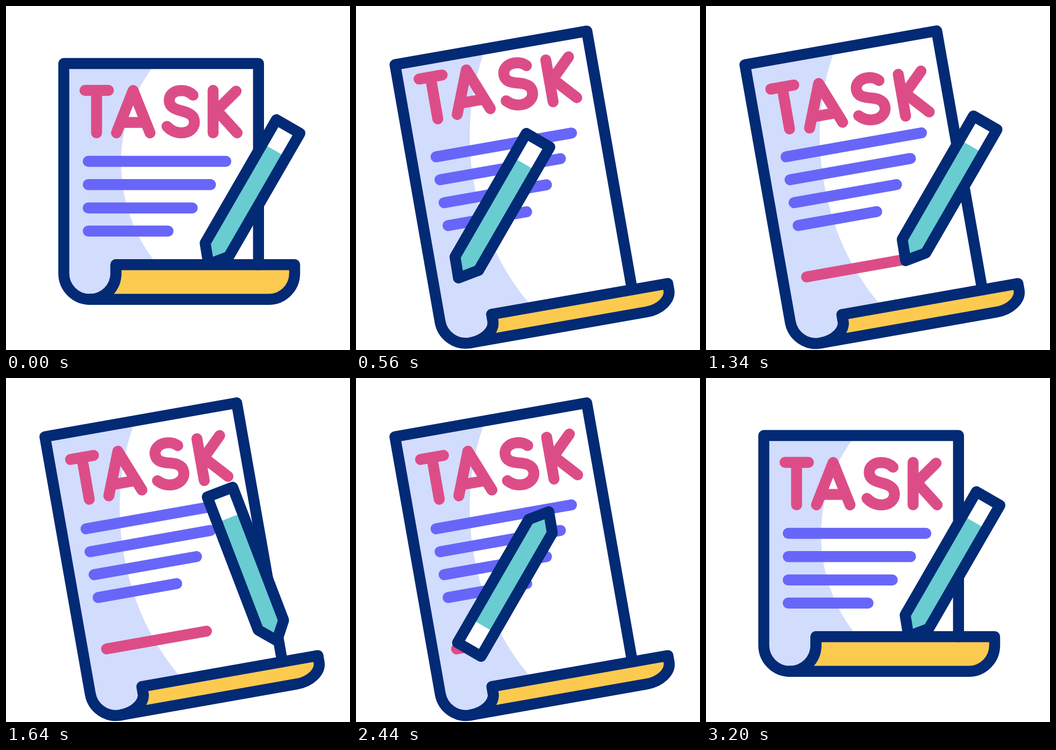
These frames come from a looping animation (640x640 px, 3420 ms). An HTML page with a canvas:

```html
<!DOCTYPE html>
<html lang="en">
<head>
<meta charset="utf-8">
<title>Task</title>
<style>
html, body { margin: 0; width: 100%; height: 100%; overflow: hidden; background: #fff; }
canvas { display: block; width: 640px; height: 640px; }
</style>
</head>
<body>
<canvas id="stage" width="640" height="640" role="img" aria-label="Task"></canvas>
<script>
const ctx = document.getElementById('stage').getContext('2d');
const LOOP = 3420;
const NAVY = '#032a75', LAVENDER = '#d2dcfd', PURPLE = '#6866f9',
      PINK = '#dc4d87', TEAL = '#68ccd1', YELLOW = '#fdca50', WHITE = '#fff';
const STROKE = 20.4;

const PIVOT = [102.5, 308.7];
const HOME = [450.9, 352.3], LINE_START = [263.5, 378], LINE_END = [447, 345.2], LIFTED = [451, 350.5];

const TEXT_LINES = [[289, 409], [332.3, 380.5], [375.7, 346.5], [418.8, 301.5]];
const LETTERS = [
  'M147 157H190.5M168.5 157V236',
  'M205.5 236L236.5 157.3L268 236M216 216.6H257',
  'M348 166C342 160 335 157.3 326 157.3C313 157.3 303.7 165 303.7 175.5C303.7 188 314 192 328 195.5' +
  'C342 199 350.5 204.5 350.5 216C350.5 228 340 236 326.5 236C315 236 306 231 299.5 224',
  'M385.3 157V236M428 158.5L387 199M394 196.5L430 236'
].map(d => new Path2D(d));

const lerp = (a, b, p) => a + (b - a) * p;
const mix = (a, b, p) => [lerp(a[0], b[0], p), lerp(a[1], b[1], p)];

function ease(t, from, to) {
  const p = Math.min(1, Math.max(0, (t - from) / (to - from)));
  return p * p * (3 - 2 * p);
}

function bezier(a, b, c, d, s) {
  const r = 1 - s;
  return [0, 1].map(i => r * r * r * a[i] + 3 * r * r * s * b[i] + 3 * r * s * s * c[i] + s * s * s * d[i]);
}

function stroke(path, color) {
  ctx.strokeStyle = color;
  ctx.stroke(path);
}

function fill(path, color) {
  ctx.fillStyle = color;
  ctx.fill(path);
}

function segment(x1, y1, x2, y2, color) {
  const path = new Path2D();
  path.moveTo(x1, y1);
  path.lineTo(x2, y2);
  stroke(path, color);
}

// Quarter arcs of the scroll, from the current point to (x, y).
function arcTo(path, cx, cy, rx, ry, a, b, ccw) {
  path.ellipse(cx, cy, rx, ry, 0, a, b, ccw);
}

function drawPaper(open) {
  const left = 107.5, right = 469.8, top = 107;
  const fold = 481.2 + 115 * open, base = 545.8 + 95.7 * open;
  const bend = 497.3 + 95.7 * open, curl = 497.5 + 111 * open;
  const mid = 156, r = 48.5, lip = 204.5, end = 537;
  const h = Math.PI / 2;

  const sheet = new Path2D();
  sheet.moveTo(right, fold);
  sheet.lineTo(right, top);
  sheet.lineTo(left, top);
  sheet.lineTo(left, bend);
  arcTo(sheet, mid, bend, r, base - bend, 2 * h, h, true);
  arcTo(sheet, mid, curl, r, base - curl, h, 0, true);
  sheet.lineTo(lip, fold);

  const roll = new Path2D();
  roll.moveTo(lip, fold);
  roll.lineTo(end, fold);
  roll.lineTo(end, curl);
  arcTo(roll, end - r, curl, r, base - curl, 0, h, false);
  roll.lineTo(mid, base);
  arcTo(roll, mid, curl, r, base - curl, h, 0, true);
  roll.closePath();

  fill(sheet, LAVENDER);
  ctx.save();
  ctx.beginPath();
  ctx.rect(left, top, right - left, fold - top);
  ctx.clip();
  const k = (fold - top) / 374.2;
  const glow = new Path2D();
  glow.ellipse(513, top + 185 * k, 299, 299 * k, 0, 0, 7);
  fill(glow, WHITE);
  ctx.restore();

  fill(roll, YELLOW);
  stroke(sheet, NAVY);
  stroke(roll, NAVY);
}

// One wave: up, down, back to rest.
function wave(t) {
  const step = 490, size = 18;
  return size * (-ease(t, 0, step) + 2 * ease(t, step, 2 * step) - ease(t, 2 * step, 3 * step));
}

function drawPage(t) {
  const open = ease(t, 0, 588) - ease(t, 2612, 3200);
  ctx.save();
  ctx.translate(...PIVOT);
  ctx.rotate(-open * Math.PI / 18);
  ctx.translate(-PIVOT[0], -PIVOT[1]);
  drawPaper(open);
  TEXT_LINES.forEach(([y, x]) => segment(153, y, x, y, PURPLE));
  LETTERS.forEach((letter, i) => {
    ctx.save();
    ctx.translate(0, wave(t - 98 * i));
    stroke(letter, PINK);
    ctx.restore();
  });
  ctx.restore();
}

function drawMark(t) {
  const len = ease(t, 816, 1371) - ease(t, 1880, 2612);
  if (len > 0.001) segment(187, 504, lerp(187, 373, len), lerp(504, 471, len), PINK);
}

function pencilCentre(t) {
  if (t < 816) return mix(HOME, LINE_START, ease(t, 0, 588));
  if (t < 1371) return mix(LINE_START, LINE_END, ease(t, 816, 1371));
  if (t < 1796) return mix(LINE_END, LIFTED, ease(t, 1371, 1475));
  if (t < 2612) return bezier(LIFTED, [389, 327], [326, 381], LINE_START, ease(t, 1796, 2612));
  return mix(LINE_START, HOME, ease(t, 2612, 3200));
}

function drawPencil(t) {
  const turn = ease(t, 1455, 1985) - ease(t, 2612, 3200);
  const w = 25.3, top = -148, shoulder = 117;
  const body = new Path2D();
  body.moveTo(-w, top);
  body.lineTo(w, top);
  body.lineTo(w, shoulder);
  body.lineTo(0, 148);
  body.lineTo(-w, shoulder);
  body.closePath();

  ctx.save();
  ctx.translate(...pencilCentre(t));
  ctx.rotate(Math.PI / 6 - turn * Math.PI);
  fill(body, TEAL);
  ctx.fillStyle = WHITE;
  ctx.fillRect(-w, top, 2 * w, 51);
  stroke(body, NAVY);
  ctx.restore();
}

function frame(now) {
  const t = Math.max(0, now) % LOOP;
  ctx.fillStyle = WHITE;
  ctx.fillRect(0, 0, 640, 640);
  ctx.lineWidth = STROKE;
  ctx.lineCap = ctx.lineJoin = 'round';
  drawPage(t);
  drawMark(t);
  drawPencil(t);
  requestAnimationFrame(frame);
}
requestAnimationFrame(frame);
</script>
</body>
</html>
```
